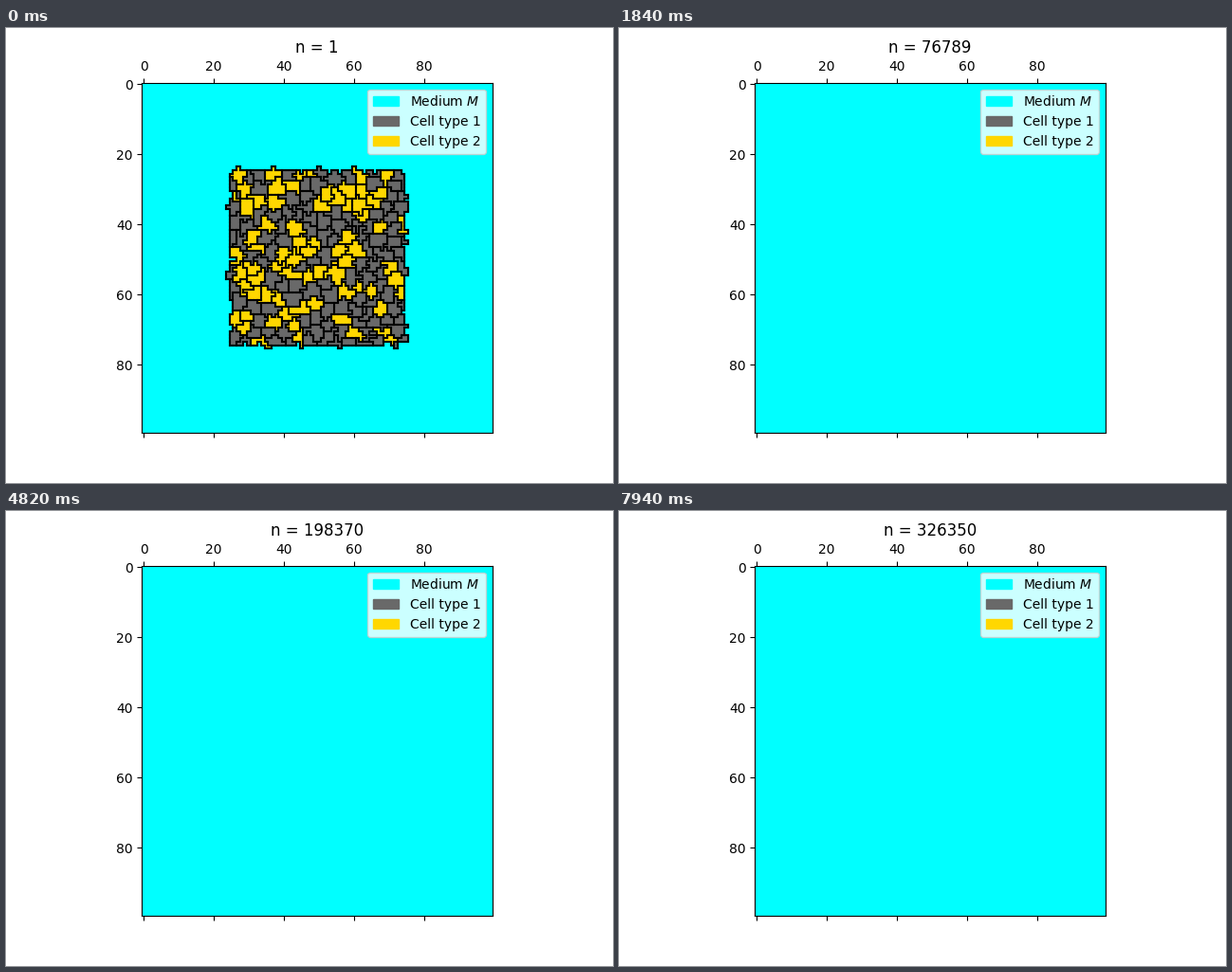
Animation of 640x480 px, one loop 8 s. Source, as a matplotlib script:

```python
import numpy as np
import matplotlib.pyplot as plt
from matplotlib.animation import FuncAnimation
from matplotlib.collections import LineCollection
from matplotlib.colors import ListedColormap
from matplotlib.patches import Patch

SIZE = 100
TICK = 20            # ms
LOOP = 8000          # ms
STRIDE = 2133        # simulation steps between pictures
COLORS = ["cyan", "dimgray", "gold"]
LABELS = ["Medium $M$", "Cell type 1", "Cell type 2"]
NEIGHBOURS = [(0, 1), (0, -1), (1, 0), (-1, 0)]

rng = np.random.default_rng(11)
rows, cols = np.mgrid[:SIZE, :SIZE]


def scatter_seeds(gap=3.0, tries=5000):
    """Random cell centres that keep their distance."""
    seeds = np.empty((0, 2))
    for p in rng.uniform(24.5, 74.5, (tries, 2)):
        if np.all(np.hypot(*(seeds - p).T) > gap):
            seeds = np.vstack([seeds, p])
    return seeds


def shifted(grid, direction):
    return np.roll(grid, direction, (0, 1))


def evolve(grid, passes, growth, decay):
    """Sites copy random neighbours; medium and cells yield at own rates."""
    for _ in range(passes):
        pick = rng.integers(0, 4, grid.shape)
        other = np.choose(pick, [shifted(grid, d) for d in NEIGHBOURS])
        chance = np.where(grid == 0, growth, decay)
        grid = np.where(rng.random(grid.shape) < chance, other, grid)
        grid[(cols < 23) | (cols > 76) | (rows < 23) | (rows > 77)] = 0
    return grid


def merge_lone(grid):
    """Give sites without an equal neighbour to one of their neighbours."""
    for direction in NEIGHBOURS:
        lone = np.all([shifted(grid, d) != grid for d in NEIGHBOURS], axis=0)
        grid = np.where(lone, shifted(grid, direction), grid)
    return grid


def first_grid(seeds):
    dx = np.abs(cols[..., None] - seeds[:, 0])
    dy = np.abs(rows[..., None] - seeds[:, 1])
    grid = np.argmin(np.maximum(dx, dy) + 0.4 * np.minimum(dx, dy), axis=2) + 1
    # square with slightly rounded corners
    u, v = (cols - 49.5) / 25.2, (rows - 49.5) / 25.2
    grid[u**16 + v**16 > 1] = 0
    return merge_lone(evolve(grid, 2, 0.25, 0.25))


def cell_kinds(seeds):
    """Type 2 thins out towards the lower right corner."""
    chance = 0.75 - 0.0035 * seeds.sum(axis=1)
    return np.append(0, 1 + (rng.random(len(seeds)) < chance))


def borders(grid):
    r, c = np.nonzero(grid[:, 1:] != grid[:, :-1])
    segs = [[(x + 0.5, y - 0.5), (x + 0.5, y + 0.5)] for y, x in zip(r, c)]
    r, c = np.nonzero(grid[1:] != grid[:-1])
    segs += [[(x - 0.5, y + 0.5), (x + 0.5, y + 0.5)] for y, x in zip(r, c)]
    return segs


seeds = scatter_seeds()
kinds = cell_kinds(seeds)
grids = [first_grid(seeds)]
for passes, growth in [(6, 0.5), (20, 0.08), (20, 0.08)]:
    grids.append(evolve(grids[-1], passes, growth, 0.8))
grids.append(np.zeros((SIZE, SIZE), int))
states = [(kinds[g], borders(g)) for g in grids]

# two pictures in five are held for 100 ms, the others for 20 ms
index = np.arange(LOOP // TICK)
hold = np.where(np.isin(index % 5, [1, 3]), 100, 20)
starts = np.cumsum(hold) - hold

fig, ax = plt.subplots(figsize=(6.4, 4.8), dpi=100)
image = ax.matshow(states[0][0], cmap=ListedColormap(COLORS), vmin=0, vmax=2)
walls = LineCollection([], colors="black", linewidths=1.5,
                       capstyle="projecting")
ax.add_collection(walls, autolim=False)
ax.legend(handles=[Patch(color=c, label=t) for c, t in zip(COLORS, LABELS)],
          loc="upper right")
title = ax.set_title("n = 1")


def update(frame):
    step = int(np.searchsorted(starts, frame * TICK, side="right")) - 1
    kind, segs = states[min(step, len(states) - 1)]
    image.set_data(kind)
    walls.set_segments(segs)
    title.set_text(f"n = {1 + STRIDE * step}")
    return image, walls, title


anim = FuncAnimation(fig, update, frames=LOOP // TICK, interval=TICK,
                     repeat=True, repeat_delay=0, blit=False)
plt.show()
```
